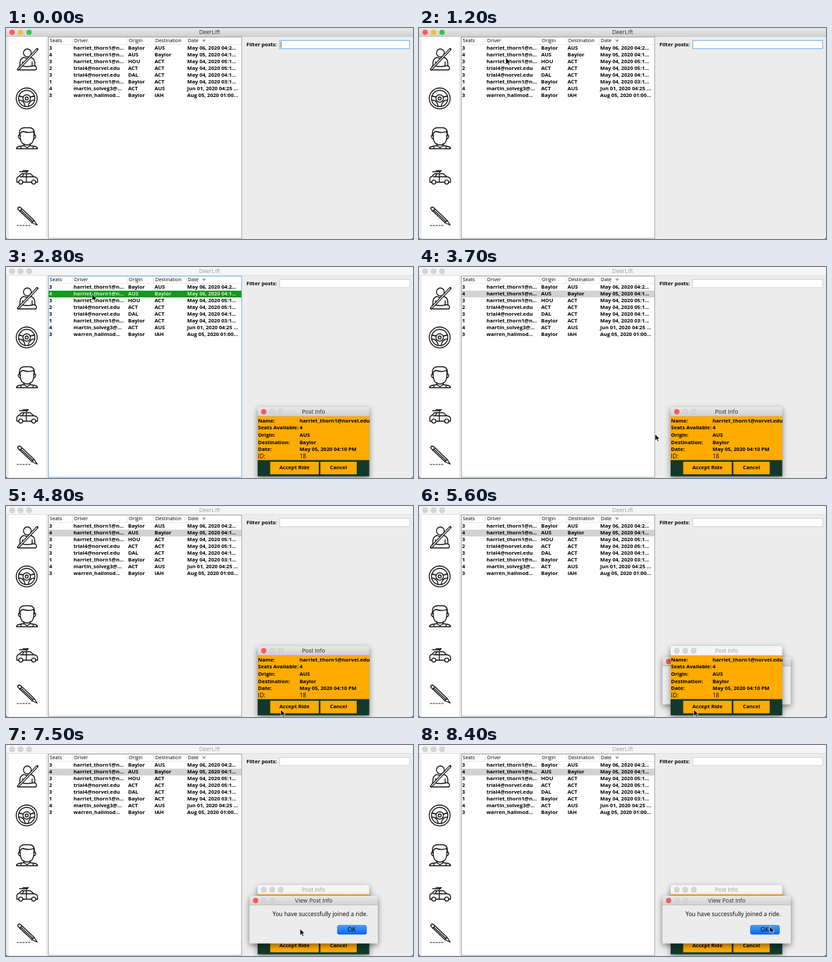
These frames come from a looping animation (600 by 312 pixels, 8.5 s). An HTML page:

```html
<!DOCTYPE html>
<html lang="en">
<head>
<meta charset="utf-8">
<title>Ride board</title>
<style>
  html, body { margin: 0; width: 100%; height: 100%; overflow: hidden; background: #ececec; }
  svg { display: block; width: 600px; height: 312px; }
  text { font: 7.2px "Open Sans", "Noto Sans", sans-serif; white-space: pre; }
  .bold { font-weight: 700; font-size: 7.65px; }
  .bar { font: 8.2px Inter, "Liberation Sans", sans-serif; text-anchor: middle; }
  .plain { font-size: 8.6px; }
  .mid { text-anchor: middle; }
  .icon { fill: none; stroke: #111; stroke-width: 1.35; stroke-linejoin: round; stroke-linecap: round; }
  .window { filter: drop-shadow(0 3px 4px #0007); }
</style>
</head>
<body>
<svg viewBox="0 0 600 312">
  <defs>
    <linearGradient id="active" x2="0" y2="1"><stop stop-color="#e8e8e8"/><stop offset="1" stop-color="#d0d0d0"/></linearGradient>
    <linearGradient id="button" x2="0" y2="1"><stop stop-color="#4a9dfa"/><stop offset="1" stop-color="#0868ee"/></linearGradient>
  </defs>
  <g id="scene"></g>
</svg>
<script>
const LOOP = 8500, STEP = 100;
const COLUMNS = [63.5, 99.5, 180, 219, 267];
const USER = 'harriet_thorn1@n...', TESTER = 'trial4@norvel.edu';
const RIDES = [
  [3, USER, 'Baylor', 'AUS', 'May 06, 2020 04:2...'],
  [4, USER, 'AUS', 'Baylor', 'May 05, 2020 04:1...'],
  [3, USER, 'HOU', 'ACT', 'May 04, 2020 05:1...'],
  [2, TESTER, 'ACT', 'ACT', 'May 04, 2020 05:1...'],
  [3, TESTER, 'DAL', 'ACT', 'May 04, 2020 04:1...'],
  [1, USER, 'Baylor', 'ACT', 'May 04, 2020 03:1...'],
  [4, 'martin_solveg3@...', 'ACT', 'AUS', 'Jun 01, 2020 04:25 ...'],
  [3, 'warren_hallmod...', 'Baylor', 'IAH', 'Aug 05, 2020 01:00...']
];
const DETAILS = [
  ['Name:', 'harriet_thorn1@norvel.edu'], ['Seats Available:', '4'], ['Origin:', 'AUS'],
  ['Destination:', 'Baylor'], ['Date:', 'May 05, 2020 04:10 PM'], ['ID:', '18']
];
// Pointer stops: time, x, y
const STOPS = [
  [300, 12, 284], [600, 45, 130], [900, 105, 65], [1100, 126, 48], [1200, 128, 44],
  [2300, 128, 44], [2600, 127, 40], [3200, 127, 40], [3700, 348, 247], [4100, 392, 288],
  [4700, 405, 301], [6100, 405, 301], [6900, 370, 274], [7100, 369, 274], [8000, 514, 269],
  [8400, 517, 268], [LOOP, 517, 268]
];

const rect = (x, y, w, h, fill, more = '') =>
  `<rect x="${x}" y="${y}" width="${w}" height="${h}" fill="${fill}" ${more}/>`;
const path = (d, more = '') => `<path d="${d}" ${more}/>`;
const circle = (x, y, r, more = '') => `<circle cx="${x}" cy="${y}" r="${r}" ${more}/>`;
const text = (x, y, s, cls = '', fill = '#000') =>
  `<text x="${x}" y="${y}" class="${cls}" fill="${fill}">${s}</text>`;

function titleBar(x, y, w, h, title, active, lights) {
  const mid = y + h / 2;
  const dots = [0, 1, 2].map(i => circle(x + 9 + i * 12.5, mid, 3.9, lights[i]
    ? `fill="${lights[i]}"` : 'fill="#d6d6d6" stroke="#c3c3c3" stroke-width=".5"')).join('');
  return path(`M${x} ${y + h}v${3 - h}q0-3 3-3h${w - 6}q3 0 3 3v${h - 3}z`, `fill="${active ? 'url(#active)' : '#f5f5f5'}"`)
    + rect(x, y + h - .6, w, .6, active ? '#b4b4b4' : '#d4d4d4') + dots
    + text(x + w / 2, mid + 2.8, title, 'bar', active ? '#333' : '#a3a3a3');
}

const icons = '<g class="icon">'
  // Seat belt
  + circle(31.5, 36.8, 5.8)
  + path('M20.5 56q-1-11 6-12.5q5 3 10 0q7 1.5 6 12.5M24.5 50v6M38.5 50v6')
  + path('M18.5 59.5q1-4.5 5-3.5q8 2 16 0q5-1 5.5 3.5q0 2.500-2 2.500h-22.500q-2 0-2-2.500z')
  + path('M18 61L46 31.500', 'stroke-width="3.6"')
  + path('M18.500 60.500L45.500 32', 'stroke="#fff" stroke-width="1.1"')
  // Steering wheel
  + circle(30.500, 104.200, 15.400) + circle(30.500, 104.200, 12)
  + circle(30.500, 104.200, 5.500) + circle(30.500, 104.200, 2.200)
  + path('M19 100.500q3 1 6.500 1.500M42 100.500q-3 1-6.500 1.500M19 106.500q6 0 8.500 6l.5 3M42 106.500q-6 0-8.500 6l-.5 3')
  // Passenger
  + path('M20.500 160q-3-12 7-12.500h8q8 1 6 12.500M20.500 157q2-4 5-4q8 3 15 0l1 4M21 158v4q1 11 10 11t10-11v-4M20.500 158q-3 0-2 4q1 2 3 2M41.500 158q3 0 2 4q-1 2-3 2')
  + path('M26.500 171v3l-7 1q-4 1-4 3.500h31q0-2.500-4-3.500l-7-1v-3M26.500 174l4.500 3l4.500-3M22 176v2M40 176v2')
  // Car
  + path('M18.500 228h-2.500v-6q1-2 3-2.500l4-4h13l5 4.500q5 .5 5.500 4v4h-2.500M25 228h12.500M21 220h19M30 216v11M24 220l2-4')
  + path('M20 212.500h11M25 210.800h8l-3 3')
  + circle(21.800, 227.800, 3) + circle(40.800, 227.800, 3)
  // Pencil
  + path('M18 265.500q1.500-1.500 3.500 0l20 19l4.500 7l-7.500-3.500l-20-19q-2-2 -.5-3.500zM23.500 267.500l-3.500 3.500M41.500 284.500l-3.500 3.500M22.500 270l17 16')
  + path('M16.500 292h20', 'stroke-width="1.2" stroke-dasharray="2 2.200"') + '</g>';

function mainWindow(t) {
  const focused = t < 2800, fresh = t === 2800;
  const caret = focused && Math.floor((t + 400) / 500) % 2 === 0;
  let out = rect(0, 0, 600, 312, '#ececec')
    + titleBar(0, 0, 600, 12.6, 'DeerLift', focused, focused ? ['#fb5a55', '#f5bd3d', '#35c64a'] : [])
    + rect(4, 13, 55, 298, '#fff') + icons
    + rect(62.500, 13.500, 285, 297.500, '#fff', `stroke="${fresh ? '#7fb2e5' : '#aaa'}"`)
    + rect(63, 24.500, 284, .5, '#d8d8d8')
    + [97.500, 178, 217, 265.500].map(x => rect(x, 14, .6, 10.5, '#d8d8d8')).join('')
    + path('M289 17.300h6l-3 3.500z', 'fill="#999"');
  if (!focused) out += rect(63, 35, 284, 10, fresh ? '#129a1c' : '#d2d2d2');
  ['Seats', 'Driver', 'Origin', 'Destination', 'Date'].forEach((s, i) =>
    out += text(COLUMNS[i] + 1, 21.300, s));
  RIDES.forEach((ride, row) => ride.forEach((s, i) =>
    out += text(COLUMNS[i], 31.800 + row * 10, s, 'bold', fresh && row === 1 ? '#d3ead3' : '#000')));
  return out + text(354.500, 27, 'Filter posts:', 'bold')
    + rect(403.500, 18.500, 191.500, 12, '#fff', `stroke="${focused ? '#85b5e8' : '#c6c6c6'}" stroke-width="${focused ? 1.2 : .7}"`)
    + (caret ? rect(405, 20, .7, 9, '#222') : '')
    + path('M0 309v3h3q-3 0-3-3zM600 309v3h-3q3 0 3-3z', 'fill="#222"');
}

function rideDialog(active) {
  return '<g class="window">' + titleBar(371, 207, 164.500, 14, 'Post Info', active, active ? ['#fb5a55'] : [])
    + rect(371, 221, 164.500, 65, '#ffab00') + rect(371, 285.500, 164.500, 24, '#11392c')
    + rect(389.500, 288, 71.500, 18.500, '#ffab00') + rect(463.500, 288, 53.500, 18.500, '#ffab00') + '</g>'
    + DETAILS.map((pair, row) => pair.map((s, i) =>
      text(i ? 432.700 : 371.500, 229.500 + row * 10.700, s, row < 5 ? 'bold' : 'plain')).join('')).join('')
    + text(425.200, 299.300, 'Accept Ride', 'bold mid') + text(490.200, 299.300, 'Cancel', 'bold mid');
}

function joinedDialog() {
  return '<g class="window">' + titleBar(359, 223, 189, 14, 'View Post Info', true, ['#fb5a55'])
    + rect(359, 237, 189, 56.500, '#ececec') + '</g>'
    + text(393, 252.500, 'You have successfully joined a ride.', 'plain')
    + rect(488.500, 266.500, 43, 13.500, 'url(#button)', 'rx="2.5" stroke="#1260c8" stroke-width=".5"')
    + text(509.500, 276.300, 'OK', 'plain mid');
}

function pointer(t) {
  if (t < 300) return '';
  const i = STOPS.findIndex(stop => stop[0] > t);
  const [t0, x0, y0] = STOPS[i - 1], [t1, x1, y1] = STOPS[i];
  const p = (t - t0) / (t1 - t0);
  return path('M0 0V9.700L2.300 7.600L3.900 11.100L5.500 10.400L4 7H7z',
    `transform="translate(${x0 + (x1 - x0) * p} ${y0 + (y1 - y0) * p})" fill="#000" stroke="#fff" stroke-width=".7"`);
}

const scene = document.getElementById('scene');
let last = -1;
function draw(now) {
  const t = Math.floor(now % LOOP / STEP) * STEP;
  if (t !== last) {
    const dialogs = [];
    if (t >= 2800) dialogs.push(rideDialog(t < 5600));
    if (t >= 7000) dialogs.push(joinedDialog());
    else if (t >= 5600) dialogs.unshift(joinedDialog());
    scene.innerHTML = mainWindow(t) + dialogs.join('') + pointer(t);
    last = t;
  }
  requestAnimationFrame(draw);
}
draw(performance.now());
</script>
</body>
</html>
```
